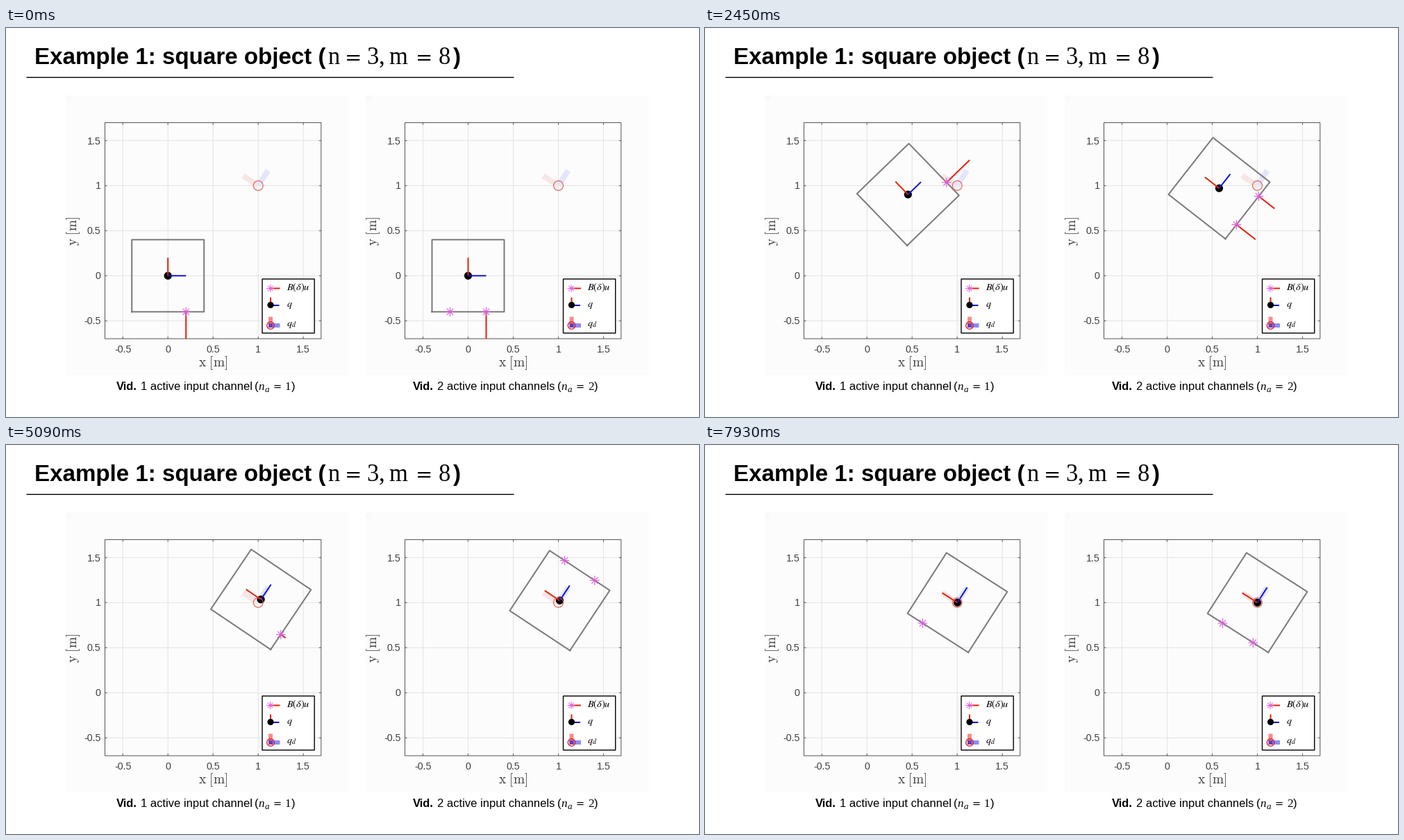
A matplotlib script for the animation above (8 s loop, 998 by 561 pixels).

```python
import numpy as np
import matplotlib.pyplot as plt
from matplotlib.animation import FuncAnimation
from matplotlib.patches import Circle, Rectangle

W, H, DPI = 998, 561, 128
PT = 72 / DPI
UNIT = 130
STEP_MS = 40
SANS, SERIF = "Liberation Sans", "Liberation Serif"
RED, BLUE, STAR = "#f21a0a", "#1212dc", "#d95bd9"

fig = plt.figure(figsize=(W / DPI, H / DPI), dpi=DPI, facecolor="white")
ax = fig.add_axes([0, 0, 1, 1])
# whole numbers are pixel centres
ax.set_xlim(-0.5, W - 0.5)
ax.set_ylim(H - 0.5, -0.5)
ax.axis("off")


def label(x, y, s, size, font=SANS, color="black", ha="left", va="baseline", **kw):
    return ax.text(x, y, s, fontsize=size * PT, family=font, color=color,
                   ha=ha, va=va, **kw)


def math_label(x, y, s, size, **kw):
    return label(x, y, f"${s}$", size, math_fontfamily="stix", **kw)


def line(xs, ys, color, width, z=2, **kw):
    kw.setdefault("solid_capstyle", "butt")
    return ax.plot(xs, ys, color=color, lw=width * PT, zorder=z, snap=False, **kw)[0]


def box(x0, y0, x1, y1, face="none", edge="none", width=1, z=1):
    return ax.add_patch(Rectangle((x0, y0), x1 - x0, y1 - y0, facecolor=face,
                                  edgecolor=edge, lw=width * PT, zorder=z,
                                  snap=False))


def disc(x, y, r, face="none", edge="none", width=1, z=5):
    return ax.add_patch(Circle((x, y), r, facecolor=face, edgecolor=edge,
                               lw=width * PT, zorder=z))


def star_path(x, y, r):
    """Eight-armed asterisk as one broken line."""
    xs, ys = [], []
    for k in range(4):
        reach = r if k % 2 == 0 else r * 0.95
        dx, dy = reach * np.cos(k * np.pi / 4), reach * np.sin(k * np.pi / 4)
        xs += [x - dx, x + dx, np.nan]
        ys += [y - dy, y + dy, np.nan]
    return xs, ys


def smooth(keys, vals, n):
    """Cubic Hermite curve through the keys, at rest at both ends."""
    keys, vals = np.array(keys, float), np.array(vals, float)
    slope = np.gradient(vals, keys)
    slope[0] = slope[-1] = 0
    i = int(np.clip(np.searchsorted(keys, n, side="right") - 1, 0, len(keys) - 2))
    h = keys[i + 1] - keys[i]
    t = (n - keys[i]) / h
    return ((1 + 2 * t) * (1 - t) ** 2 * vals[i] + t * (1 - t) ** 2 * h * slope[i]
            + t * t * (3 - 2 * t) * vals[i + 1] + t * t * (t - 1) * h * slope[i + 1])


KEYS = [0, 8, 17, 31, 51, 63, 80]
GOAL = 1.0
# outward normal and tangent of each face
FACES = {"S": ((0, -1), (1, 0)), "N": ((0, 1), (1, 0)),
         "W": ((-1, 0), (0, 1)), "E": ((1, 0), (0, 1))}


class Panel:
    def __init__(self, dx, legend_dx, path, pushes):
        self.x0, self.y0 = 232.7 + dx, 356.8
        self.path, self.pushes = path, pushes
        self.draw_axes(round(dx))
        self.draw_goal()
        self.draw_legend(legend_dx)
        clip = Rectangle((142 + dx, 136), 311.5, 311.5, transform=ax.transData)
        self.square = line([], [], "#7a7a7a", 2, 4, solid_joinstyle="round",
                           solid_capstyle="projecting")
        self.arm_y = line([], [], "#e62408", 2, 7)
        self.arm_x = line([], [], BLUE, 2, 7)
        self.dot = disc(0, 0, 5.6, "black", z=6)
        self.forces = [line([], [], RED, 2, 8) for _ in range(2)]
        self.stars = [line([], [], STAR, 1.1, 9) for _ in range(2)]
        for art in [self.square, self.arm_x, self.arm_y, *self.forces]:
            art.set_clip_path(clip)

    def px(self, x, y):
        return self.x0 + UNIT * x, self.y0 - UNIT * y

    def draw_axes(self, dx):
        left, right, top, bottom = 142 + dx, 453.3 + dx, 136, 447.6
        box(86 + dx, 97, 493 + dx, 500, "#fcfcfc", z=0)
        box(86 + dx, 97, 94 + dx, 105, "#f9f9f9", z=0)
        for v in (-0.5, 0, 0.5, 1, 1.5):
            x, y = self.px(v, v)
            line([x, x], [top, bottom], "#e3e3e3", 1, 1)
            line([left, right], [y, y], "#e3e3e3", 1, 1)
            for a, b in ((top, top + 3), (bottom - 3, bottom)):
                line([x, x], [a, b], "#555555", 1)
            for a, b in ((left, left + 3), (right - 3, right)):
                line([a, b], [y, y], "#555555", 1)
            label(x, 467.5, f"{v:g}", 14.3, color="#404040", ha="center")
            label(136 + dx, y + 5.2, f"{v:g}", 14.3, color="#404040", ha="right")
        box(left, top, right, bottom, edge="#555555", z=3)
        kw = dict(color="#383838", ha="center", math_fontfamily="cm")
        label(297.5 + dx, 488, r"$\mathrm{x\ [m]}$", 19.4, **kw)
        label(97 + dx, 292, r"$\mathrm{y\ [m]}$", 19.4, va="center", rotation=90, **kw)

    def draw_goal(self):
        gx, gy = self.px(1, 1)
        c, s = 26 * np.cos(GOAL), 26 * np.sin(GOAL)
        line([gx, gx - s], [gy, gy - c], "#f8e5e5", 8, 3)
        line([gx, gx + c], [gy, gy - s], "#e5e5fa", 8, 3)
        disc(gx, gy, 6.9, edge="#dc5a50", width=1.1, z=8)

    def draw_legend(self, dx):
        x = 380.5 + dx
        box(368.5 + dx, 361.5, 443.7 + dx, 439.5, "white", "black", 1.4, 10)
        line([x, x + 13.5], [375, 375], RED, 2, 11)
        line(*star_path(x - 0.5, 375, 5.5), "#e35fe3", 1, 12)
        line([x, x], [399, 388], RED, 2, 11)
        line([x, x + 12.5], [399.5, 399.5], BLUE, 2, 11)
        disc(x, 399, 4.6, "black", z=12)
        line([x, x], [416, 429], "#f58c8c", 6, 11)
        line([x, x + 13.5], [428.5, 428.5], "#8c8cf5", 6, 11)
        box(x - 3, 425.5, x + 3, 431.5, "#6a3fb0", z=12)
        disc(x, 428.5, 5.2, edge="#e0142a", width=1.3, z=13)
        for y, s in ((377.5, r"B(\delta)u"), (402, "q"), (430.5, "q_d")):
            math_label(403.5 + dx, y, s, 14.2, zorder=12)

    def update(self, n):
        x, y, deg = (smooth(KEYS, v, n) for v in self.path)
        a = np.radians(deg)
        c, s = np.cos(a), np.sin(a)

        def world(bx, by):
            return self.px(x + c * bx - s * by, y + s * bx + c * by)

        def join(art, *pts):
            art.set_data(*zip(*[world(*p) for p in pts]))

        r = 0.4
        join(self.square, (-r, -r), (r, -r), (r, r), (-r, r), (-r, -r))
        join(self.arm_x, (0, 0), (0.2, 0))
        join(self.arm_y, (0, 0), (0, 0.2))
        self.dot.center = world(0, 0)

        i = max(k for k, p in enumerate(self.pushes) if p[0] <= n)
        start, face, contacts = self.pushes[i]
        end = self.pushes[i + 1][0] if i + 1 < len(self.pushes) else 81
        t = (n - start) / (end - start)
        (nx, ny), (tx, ty) = FACES[face]
        for k in range(2):
            if k >= len(contacts):
                self.forces[k].set_data([], [])
                self.stars[k].set_data([], [])
                continue
            off, f0, f1 = contacts[k]
            bx, by = r * nx + off * tx, r * ny + off * ty
            f = max(0, f0 + (f1 - f0) * t) / UNIT
            join(self.forces[k], (bx, by), (bx + f * nx, by + f * ny))
            self.stars[k].set_data(*star_path(*world(bx, by), 6.8))


def equals(x, y, size):
    label(x, y, "=", size, "DejaVu Sans")


def caption(x, text, shift, count):
    y = 521.5
    label(x, y, "Vid.", 16.55, weight="bold")
    label(x + 35, y, text, 16.55)
    label(357.5 + shift, y, "(", 16.55)
    label(363 + shift, y, "n", 17, SERIF, style="italic")
    label(372 + shift, y + 3, "a", 13, SERIF, style="italic")
    equals(384.5 + shift, y, 14.5)
    label(401.5 + shift, y, count, 17, SERIF)
    label(410.5 + shift, y, ")", 16.55)


TITLE_Y = 51.5
label(40.3, TITLE_Y, "Example 1: square object (", 33.15, weight="bold")
for x, s in ((462.5, "n"), (519, "3"), (536.5, ","), (551, "m"), (622.5, "8")):
    label(x, TITLE_Y, s, 34.5, SERIF)
for x in (487.5, 589.5):
    equals(x, TITLE_Y, 29)
label(643.5, TITLE_Y, ")", 33.15, weight="bold")
line([29, 731], [70.8, 70.8], "black", 1.4)
caption(158.5, "1 active input channel", 0, "1")
caption(585.5, "2 active input channels", 436, "2")

# pushes: start step, face, then (offset along face, force at start, force at end)
one = Panel(
    0, 0,
    ([0, 0.006, 0.18, 0.737, 1.03, 1.025, 1.002],
     [0, 0.2, 0.615, 1.108, 1.035, 1.008, 1.0],
     [0, 20.4, 35.2, 50.5, 56, 57, 57.3]),
    [(0, "S", [(0.2, 90, 55)]), (6, "W", [(0.2, 62, 25)]),
     (13, "W", [(-0.2, 28, 0)]), (22, "E", [(-0.2, 49.5, 21)]),
     (41, "S", [(-0.2, 16, -4.2)]), (68, "W", [(0.2, 0, 0)])])
two = Panel(
    432.3, 433.5,
    ([0, -0.003, 0.225, 0.915, 1.015, 1.0, 1.0],
     [0, 0.227, 0.792, 1.027, 1.023, 1.004, 1.0],
     [0, 21.3, 45, 54, 56.5, 57.2, 57.3]),
    [(0, "S", [(-0.2, 0, 0), (0.2, 90, 60)]),
     (4, "W", [(0.2, 62, 40), (-0.2, 30, 15)]),
     (13, "N", [(0.2, 60, 30), (-0.2, 46, 21)]),
     (23, "S", [(0.2, 30, 13), (-0.2, 36, 15)]),
     (40, "E", [(0.2, 6, -4), (-0.2, 8, -4)]),
     (56, "W", [(0.2, 0, 0), (-0.2, 0, 0)])])


def sim_step(ms):
    """Steps arrive in runs of nine, alternately 80 and 120 ms apart."""
    if ms < 210:
        return 0
    run, rest = divmod(ms - 210, 880)
    first = 120 if run == 3 else 80
    pair, part = divmod(rest, 200)
    return 9 * run + min(8, 2 * pair + (part >= first)) + 1


def update(frame):
    n = sim_step(frame * STEP_MS + 10)
    one.update(n)
    two.update(n)
    return []


anim = FuncAnimation(fig, update, frames=8000 // STEP_MS, interval=STEP_MS,
                     init_func=lambda: update(0), repeat=True, repeat_delay=0)
plt.show()
```
